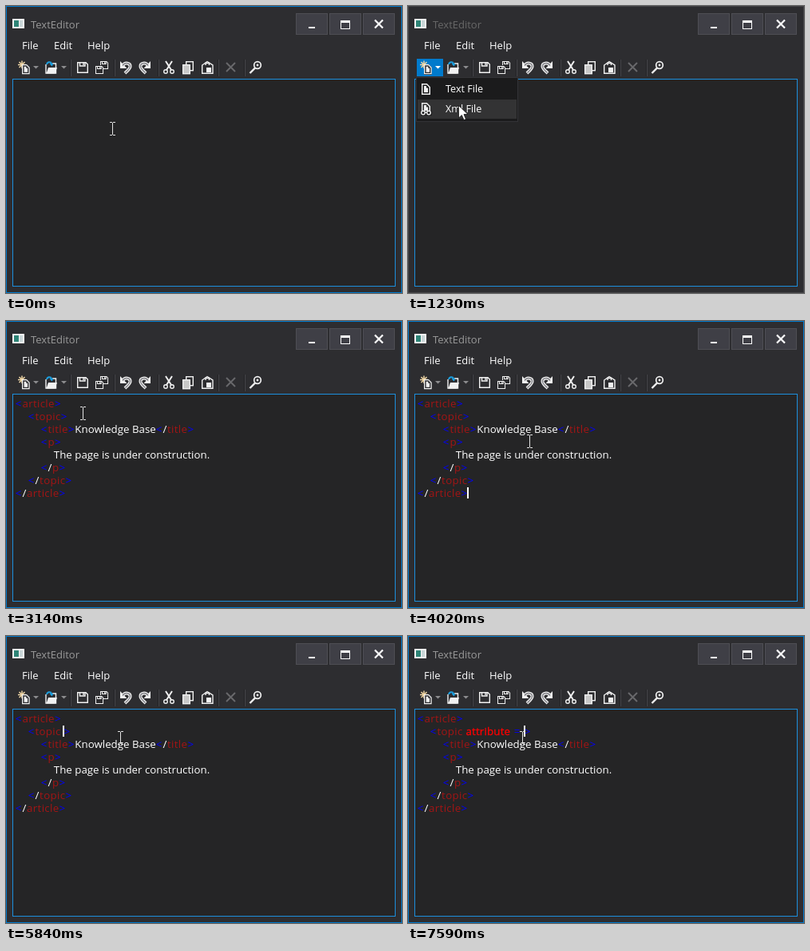
Animation of 496 by 359 pixels, one loop 8000 ms. Source, as an HTML page:

```html
<!DOCTYPE html>
<html lang="en">
<head>
<meta charset="utf-8">
<title>TextEditor</title>
<style>
  html, body { margin: 0; width: 100%; height: 100%; overflow: hidden; background: #2d2d30; }
  svg { display: block; width: 496px; height: 359px; font: 13px "Open Sans", "Noto Sans", sans-serif; }
  text { fill: #fff; white-space: pre; }
  .crisp { shape-rendering: crispEdges; }
  .frame { fill: none; stroke: #007acc; }
  .title { fill: #999; }
  .inactive .frame { stroke: #434346; }
  .inactive .title { fill: #686868; }
  .button { fill: #3f3f46; stroke: #4e4e54; }
  .line { fill: none; stroke: #f1f1f1; stroke-width: 1.4; }
  .solid { fill: #f1f1f1; }
  .drop { fill: #8c8c8e; }
  .open .drop.first { fill: #fff; }
  .saves .line { stroke-width: 1.2; }
  .ready .saves .line { stroke-width: 1.7; }
  .core { fill: none; stroke: #85858a; stroke-width: 1.5; }
  .edited .undo .core { stroke: #1683d8; }
  .edited .undo .solid { fill: #8cc6f2; }
  .edited .undo .line { stroke: #b4dbf7; }
  .popup text { font-size: 12.6px; }
  .code text { font-size: 13.3px; }
  .mark { fill: #00f; letter-spacing: 1px; }
  .slash { letter-spacing: .8px; }
  .tag { fill: #a31515; letter-spacing: .35px; }
  .attr { fill: #f00; stroke: #f00; stroke-width: .3px; letter-spacing: .2px; }
</style>
</head>
<body>
<svg id="stage" viewBox="0 0 496 359">
  <defs>
    <g id="page">
      <path class="line" d="M.7 .7H6.5L10.3 4.5V13.3H.7Z"/>
      <path class="solid" d="M3 3H6V5.500H8V11H3Z"/>
    </g>
    <g id="floppy">
      <path class="line" d="M.7 .7H11L13.3 3V13.3H.7Z"/>
      <path class="line" d="M3.500 1V5H10V1M8 1V4"/>
    </g>
    <g id="turn">
      <path class="line" style="stroke-width:4" d="M146 74.500C149 70 156 71 155.500 76C155 79 152 81 149 84"/>
      <path class="solid" d="M143 69V78H151.500Z"/>
      <path class="core" d="M146 74.500C149 70 156 71 155.500 76C155 79 152 81 149.500 83.500"/>
    </g>
  </defs>

  <rect width="496" height="359" fill="#2d2d30"/>
  <rect class="frame crisp" x=".5" y=".5" width="495" height="358"/>

  <g class="crisp">
    <rect x="8" y="16" width="15" height="12" fill="#f4f4f4"/>
    <rect x="10" y="18" width="6" height="8" fill="#2f8577"/>
    <rect x="17" y="18" width="4" height="8" fill="#c9d6d8"/>
    <rect class="button" x="363.5" y="9.5" width="39" height="26"/>
    <rect class="button" x="405.5" y="9.5" width="39" height="26"/>
    <rect class="button" x="447.5" y="9.5" width="39" height="26"/>
    <path fill="#fff" d="M379 26h8v2h-8ZM419 18h12v11h-12ZM420 21v7h10v-7Z" fill-rule="evenodd"/>
  </g>
  <path d="M462 17.500L472 27.500M472 17.500L462 27.500" stroke="#fff" stroke-width="2.200"/>
  <text class="title" x="31" y="28">TextEditor</text>
  <text x="20" y="54">File</text>
  <text x="60" y="54">Edit</text>
  <text x="102" y="54">Help</text>

  <rect id="hover" class="crisp" x="11" y="66" width="33" height="22"/>
  <g id="bars" class="crisp"></g>

  <!-- new, open -->
  <path d="M20 68.500V78M15 73.500H25M16.500 70L23.500 77M23.500 70L16.500 77" stroke="#f0d6a4" stroke-width="1.500"/>
  <path d="M20 73H26L29.500 76.500V86H20Z" fill="#2d2d30"/>
  <use href="#page" transform="translate(20 73) scale(.88)"/>
  <path class="drop first" d="M34 75h7l-3.500 3.500Z"/>
  <path class="line" d="M50 73V84H62.500V72H58"/>
  <path class="solid" d="M53 77H64L61.500 84.500H50.500Z"/>
  <path d="M51 73C52 69.500 56 69.500 57 72" fill="none" stroke="#1ba1e2" stroke-width="2"/>
  <path d="M54.500 72H59.500L57.500 75.500Z" fill="#1ba1e2"/>
  <path class="drop" d="M69 75h7l-3.500 3.500Z"/>

  <!-- save, save all -->
  <g class="saves">
    <use href="#floppy" x="89" y="70"/>
    <use href="#floppy" transform="translate(118 69) scale(.72)"/>
    <rect x="112" y="74" width="10" height="11" fill="#2d2d30"/>
    <use href="#floppy" transform="translate(112 75) scale(.72)"/>
  </g>

  <g class="undo"><use href="#turn"/></g>
  <use href="#turn" transform="translate(324) scale(-1 1)"/>

  <!-- cut, copy, paste, delete, find -->
  <path class="line" style="stroke-width:2" d="M200 69L207 80M208 69L201 80"/>
  <circle class="line" cx="200" cy="82" r="2.300"/>
  <circle class="line" cx="208" cy="82" r="2.300"/>
  <rect class="line" x="225.700" y="69.700" width="8.600" height="11"/>
  <rect x="221.700" y="73.700" width="8.600" height="11" fill="#c8c8c8" stroke="#f1f1f1" stroke-width="1.400"/>
  <path class="line" d="M245.700 84.300V74L252 69.500L259 74V84.300Z"/>
  <path class="line" d="M250 74V71.500H254.500V74"/>
  <rect class="solid" x="251" y="77" width="6" height="6"/>
  <path d="M276 71L287 82M287 71L276 82" stroke="#68686b" stroke-width="2"/>
  <circle class="line" cx="315" cy="74" r="4.300" style="stroke-width:1.700"/>
  <circle class="solid" cx="315" cy="74" r="1.400"/>
  <path class="line" style="stroke-width:2.400" d="M312 77.500L305.500 84"/>

  <rect class="crisp" x="8.5" y="91.5" width="479" height="259" fill="#252526" stroke="#1c8fdc"/>
  <g id="code" class="code"></g>

  <g id="popup" class="popup">
    <rect class="crisp" x="10.5" y="89.5" width="127" height="55" fill="#1b1b1c" stroke="#333337"/>
    <rect id="pick" class="crisp" x="12" width="124" height="24" fill="#333334"/>
    <use href="#page" x="17" y="97"/>
    <use href="#page" x="17" y="121"/>
    <path d="M16 131h14v6h-14Z" fill="#1b1b1c"/>
    <circle class="line" cx="19" cy="133.500" r="2.300"/>
    <circle class="line" cx="26" cy="133.500" r="2.300"/>
    <path class="line" d="M21 133H24"/>
    <text x="47" y="108">Text File</text>
    <text x="47" y="133">Xml File</text>
  </g>

  <rect id="caret" class="crisp" width="2" height="14" fill="#fff"/>
  <path id="beam" class="crisp" fill="#e2e2e2" d="M-3 -8h3v1h-3ZM1 -8h3v1h-3ZM0 -7h1v15h-1ZM-3 8h3v1h-3ZM1 8h3v1h-3Z"/>
  <path id="arrow" fill="#fff" stroke="#111" stroke-width=".8" d="M.5 .5V16L4.300 12.500L7 18.500L9.500 17.500L7 11.500H12Z"/>
</svg>
<script>
  const LOOP = 8000;
  const $ = id => document.getElementById(id);
  const stage = $('stage');

  $('bars').innerHTML = [80, 135, 190, 265, 298].map(x =>
    `<path d="M${x} 67h1v21h-1Z" fill="#222225"/><path d="M${x + 1} 67h1v21h-1Z" fill="#46464a"/>`).join('');

  // Document: indent level and content of every row
  const span = (cls, s) => `<tspan class="${cls}">${s}</tspan>`;
  const open = (name, extra = '') =>
    span('mark', '&lt;') + span('tag', name) + extra + span('mark', '&gt;');
  const close = name =>
    span('mark', '&lt;') + span('slash', '/') + span('tag', name) + span('mark', '&gt;');
  const typed = '<tspan id="attr" class="attr"></tspan><tspan id="equals" class="mark"></tspan>';
  const rows = [
    [0, open('article')],
    [1, open('topic', typed)],
    [2, open('title') + 'Knowledge Base' + close('title')],
    [2, open('p')],
    [3, 'The page is under construction.'],
    [2, close('p')],
    [1, close('topic')],
    [0, close('article')]
  ];
  $('code').innerHTML = rows.map(([level, html], i) =>
    `<text x="${11.800 + 16 * level}" y="${108 + 16 * i}">${html}</text>`).join('');
  const lines = $('code').children;

  // Pointer path: time, x, y
  const path = [
    [0, 133, 153], [30, 133, 153], [250, 98, 126], [480, 56, 93], [680, 39, 79], [930, 39, 79],
    [1250, 64, 127], [1400, 66, 128], [1610, 60, 126], [1650, 61, 126], [1810, 78, 106],
    [3139, 78, 106], [3140, 96, 115], [3190, 96, 115], [3930, 148, 148], [4020, 152, 150],
    [4250, 173, 154], [4700, 78, 128], [4800, 69, 124], [5030, 69, 124], [5160, 73, 125],
    [5270, 73, 125], [5380, 144, 128], [5520, 144, 128], [5570, 143, 127], [LOOP, 143, 127]
  ];
  const WORD = ' attribute', TAIL = ' = ';
  const keys = [5520, 5970, 6120, 6280, 6460, 6600, 6730, 6870, 6980, 7090, 7350, 7470, 7590];
  const blinks = [[2130, 2640], [2720, 3140], [3650, 4170], [4690, 5570], [5840, LOOP]];

  const within = (t, a, b) => t >= a && t < b;
  const show = (el, on) => el.setAttribute('visibility', on ? 'visible' : 'hidden');
  const place = (el, x, y) => el.setAttribute('transform', `translate(${x} ${y})`);

  function pointer(t) {
    const i = path.findIndex(p => p[0] > t);
    const [t0, x0, y0] = path[i - 1], [t1, x1, y1] = path[i];
    const k = (t - t0) / (t1 - t0);
    return [Math.round(x0 + (x1 - x0) * k), Math.round(y0 + (y1 - y0) * k)];
  }

  function drawCaret(t, count) {
    const caret = $('caret');
    show(caret, blinks.some(([a, b]) => within(t, a, b)));
    let row = 0, x = 12;
    if (t >= 5060) {
      row = 1;
      x = lines[1].getEndPositionOfChar(5 + count).x;
    } else if (t >= 2720) {
      row = 7;
      x = lines[7].getEndPositionOfChar(9).x;
    }
    place(caret, Math.round(x - 1), 96 + 16 * row);
  }

  function render(t) {
    const [x, y] = pointer(t);
    const menu = within(t, 850, 1400);
    const overBar = t < 1400 && y < 91;
    const arrow = menu || overBar;
    const hot = menu || (overBar && x < 44 && y < 88);

    stage.classList.toggle('inactive', menu);
    stage.classList.toggle('open', menu);
    stage.classList.toggle('edited', t >= 1560);
    stage.classList.toggle('ready', t >= 1650);

    show($('hover'), hot);
    $('hover').setAttribute('fill', t >= 700 ? '#007acc' : '#3e3e40');
    show($('popup'), menu);
    $('pick').setAttribute('y', y < 117 ? 92 : 117);
    $('pick').setAttribute('opacity', menu && y > 92 ? 1 : 0);

    const count = keys.filter(k => t >= k).length;
    $('attr').textContent = WORD.slice(0, count);
    $('equals').textContent = TAIL.slice(0, Math.max(0, count - WORD.length));
    show($('code'), t >= 2720);
    drawCaret(t, count);

    show($('arrow'), arrow);
    show($('beam'), !arrow);
    place($(arrow ? 'arrow' : 'beam'), x, y);
  }

  const start = performance.now();
  function tick() {
    render((performance.now() - start) % LOOP);
    requestAnimationFrame(tick);
  }
  tick();
</script>
</body>
</html>
```
